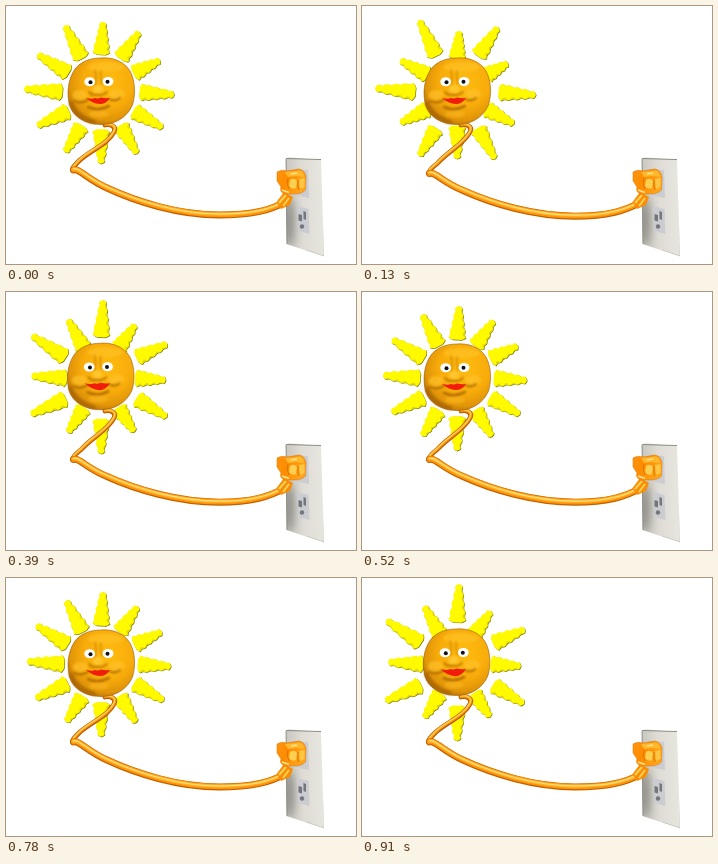
An HTML page for the animation above (1.04 s loop, 350 by 258 pixels).

```html
<!DOCTYPE html>
<html lang="en">
<head>
<meta charset="utf-8">
<title>Plugged-in sun</title>
<style>
html, body { margin: 0; width: 100%; height: 100%; overflow: hidden; background: #fff; }
svg { display: block; width: 100vw; height: 100vh; }
</style>
</head>
<body>
<svg viewBox="0 0 350 258" xmlns="http://www.w3.org/2000/svg">
  <defs>
    <radialGradient id="skin" cx="60%" cy="36%" r="68%">
      <stop offset="0" stop-color="#ffbc10"/>
      <stop offset=".55" stop-color="#f8ac0a"/>
      <stop offset=".85" stop-color="#e09408"/>
      <stop offset="1" stop-color="#b87004"/>
    </radialGradient>
    <linearGradient id="plate" x1="0" y1=".6" x2="1" y2=".5">
      <stop offset="0" stop-color="#c4c3bc"/>
      <stop offset=".45" stop-color="#dedcd4"/>
      <stop offset="1" stop-color="#e8e7df"/>
    </linearGradient>
    <linearGradient id="plug" x1="0" y1="0" x2="1" y2=".4">
      <stop offset="0" stop-color="#ff9410"/>
      <stop offset=".45" stop-color="#ff8c00"/>
      <stop offset="1" stop-color="#ffa41c"/>
    </linearGradient>
    <filter id="soft" x="-50%" y="-50%" width="200%" height="200%"><feGaussianBlur stdDeviation="1"/></filter>
    <filter id="haze" x="-100%" y="-50%" width="300%" height="200%"><feGaussianBlur stdDeviation="4"/></filter>
    <clipPath id="front"><path d="M279.500 152.500L283 151.500L315 153L318 250.500L280.500 238Z"/></clipPath>
  </defs>

  <g clip-path="url(#front)">
    <path d="M279 151H319V251H279Z" fill="url(#plate)"/>
    <ellipse cx="283" cy="216" rx="5" ry="24" fill="#77756f" opacity=".75" filter="url(#haze)"/>
    <path d="M280 153L281 238M280 152.500L315 153.500" stroke="#8b8a84" fill="none"/>
    <path d="M317.600 156L318 250L300 244" stroke="#c5c4bc" stroke-width=".8" fill="none"/>
    <path d="M286 163L302 164L303 192L287 189Z" fill="#cccdd2"/>
    <path d="M291 200L302.500 203L303.500 228L292 225Z" fill="#cbccd1"/>
    <g fill="#75757c">
      <path d="M292.500 208L296 209L296 215.500L292.500 214.500Z"/>
      <path d="M297.500 205L300 206L300 214L297.500 213Z"/>
      <circle cx="296" cy="220.500" r="2.200"/>
    </g>
  </g>

  <g id="rays"></g>

  <g id="cord" fill="none" stroke-linecap="round" stroke-linejoin="round"></g>

  <g id="connector">
    <path d="M270.500 196L278 186L287 191L284 199L275 203Z" fill="#f88e08"/>
    <path d="M273 197L280 189M277 200L283 192" stroke="#ffd050" stroke-width="2" fill="none"/>
    <path d="M271 166Q275 163 281 165L293 163Q299 164 300 171L299.500 184Q296 188 288 188L279 188Q273 186 275 181L271 175Z" fill="url(#plug)" stroke="#d87400" stroke-width=".5"/>
    <path d="M279 166L294 164.500Q298 166 298 171L290 170L282 171Z" fill="#ffb92e"/>
    <path d="M284 174Q288 171 291 175L290 182Q286 184 283 180Z" fill="#ffcf52"/>
    <path d="M293 173L298.500 172L298.500 181L294 183Z" fill="#ffc644"/>
    <path d="M282 172Q280 178 283 183M292 174Q291 180 293 184" stroke="#d87600" fill="none"/>
    <path d="M276 184L283 186.500M285 168L291 167" stroke="#ffe28c" stroke-width="1.600" fill="none"/>
  </g>

  <g id="head">
    <path d="M95 52C106 51 118 55 124 65C129 74 130 88 126.500 99C121 112 108 119 94 118.500C79 118 67 111 63.500 99C60.500 87 62 73 69 63C75 55.500 84 52 95 52Z" fill="url(#skin)" stroke="#9a5c05" stroke-width=".6"/>
    <g filter="url(#soft)" fill="none" stroke-linecap="round">
      <path d="M65 97Q70 111 88 116" stroke="#a86604" stroke-width="4" opacity=".75"/>
      <ellipse cx="100" cy="61" rx="18" ry="5" fill="#ffc52a" opacity=".6"/>
      <path d="M89 64Q91 71 89 79M95 65Q94 72 96 78" stroke="#d28a08" stroke-width="1.500"/>
      <ellipse cx="74" cy="89" rx="7.500" ry="5" fill="#ffc026" opacity=".7"/>
      <ellipse cx="111" cy="88" rx="8" ry="5" fill="#ffc026" opacity=".7"/>
      <ellipse cx="92" cy="83" rx="5" ry="4" fill="#ffc62e"/>
      <path d="M83 86Q86 90 91 88.500Q97 90 101 86" stroke="#b06a04" stroke-width="1.600"/>
      <path d="M68 95Q75 98 82 94M103 93Q109 96 114 92" stroke="#a86404" stroke-width="1.800"/>
      <path d="M82 101Q92 106 103 100" stroke="#a86404" stroke-width="2.200"/>
      <ellipse cx="93" cy="108" rx="10" ry="3.500" fill="#f9b21a" opacity=".7"/>
    </g>
    <g id="eyes">
      <ellipse cx="83.700" cy="75.800" rx="5.400" ry="4.500" fill="#fff"/>
      <ellipse cx="102" cy="75.500" rx="5.400" ry="4.500" fill="#fff"/>
      <circle cx="84.500" cy="76.200" r="2" fill="#101018"/>
      <circle cx="101.500" cy="75.800" r="2" fill="#101018"/>
    </g>
    <g id="lids" filter="url(#soft)">
      <ellipse cx="83.500" cy="74" rx="5.500" ry="3.500" fill="#ffb81c"/>
      <ellipse cx="102" cy="74" rx="5.500" ry="3.500" fill="#ffb81c"/>
      <path d="M78 78Q83 81 89 78M97 78Q102 81 108 78" fill="none" stroke="#d28a08" stroke-width="1.200"/>
    </g>
    <g id="mouth">
      <path d="M80 92Q86 93.500 89 92Q92 93 95 91.500Q99 92.500 104 92Q100 98 94 98Q86 97.500 80 92Z" fill="#f01c0c"/>
    </g>
  </g>
</svg>
<script>
const NS = 'http://www.w3.org/2000/svg';
const CX = 95, CY = 86, STEP = 130;
const $ = id => document.getElementById(id);

// Clockwise from twelve: retracted tip x, y, then extended tip x, y.
const TIPS = [
  [2, -61, 2, -80], [34, -53, 41, -65], [51, -29, 68, -35], [64, 2, 79, 3],
  [57, 32, 67, 40], [33, 53, 38, 67], [0, 67, 0, 77], [-33, 54, -38, 64],
  [-57, 31, -72, 37], [-69, -2, -82, -4], [-57, -32, -71, -44], [-33, -58, -38, -72]
];

// Reach of even rays, reach of odd rays, cord slack, eyes closed
const POSES = [
  [.48, .62, 0, 0], [0, 1, 1, 0], [.58, .4, 1, 0], [.9, .06, 1, 0],
  [.58, .4, 1, 0], [0, 1, 1, 1], [.58, .4, 0, 0], [1, 0, 0, 0]
];

const mix = (a, b, t) => a + (b - a) * t;

function add(parent, attrs) {
  const el = document.createElementNS(NS, 'path');
  for (const k in attrs) el.setAttribute(k, attrs[k]);
  return parent.appendChild(el);
}

const rays = TIPS.map(() => ({
  shade: add($('rays'), { fill: '#77730a', transform: 'translate(.6 .6)' }),
  body: add($('rays'), { fill: '#fffa00' }),
  side: add($('rays'), { fill: '#d8d000', opacity: .7 })
}));

function cable(w, dark, main) {
  const layers = [[dark, w, 0], [main, w - 1.6, -.4], ['#ffb62c', w * .42, -.8], ['#ffe07a', w * .16, -1.1]];
  return layers.map(([stroke, width, dy]) =>
    add($('cord'), { stroke, 'stroke-width': width, transform: `translate(0 ${dy})` }));
}
const upper = cable(4.8, '#b85a00', '#f58406');
const lower = cable(7, '#c06000', '#ff9208');

function drawCord(slack) {
  const s = 3.5 * slack, b = 1.2 * slack;
  const up = `M99 119C104 118 111 120 108 126C102 138 ${85 + b} ${144 + b} ${74 + b} ${154 + s}C69 ${159 + s} 66 ${162 + s} 66.500 ${164 + s}`;
  const low = `M67.500 ${164 + s}C73 ${162 + s} 81 ${173 + s} 101 ${182 + s * .7}C130 ${195.500 + s * .6} 172 ${209 + b} 213 ${209 + b}C246 ${209 + b} 264 204.500 279 196`;
  upper.forEach(p => p.setAttribute('d', up));
  lower.forEach(p => p.setAttribute('d', low));
}

function drawRay(i, reach) {
  const [ix, iy, ox, oy] = TIPS[i];
  const a = i * Math.PI / 6, r = mix(33.5, 41.5, reach);
  const bx = CX + r * Math.sin(a), by = CY - r * Math.cos(a);
  const dx = CX + mix(ix, ox, reach) - bx, dy = CY + mix(iy, oy, reach) - by;
  const len = Math.hypot(dx, dy), ux = dx / len, uy = dy / len;
  const at = (u, w) => `${(bx + dx * u - uy * w).toFixed(2)} ${(by + dy * u + ux * w).toFixed(2)}`;
  const half = u => {
    const cap = Math.min(1, Math.sqrt(.25 + u * 10), Math.sqrt((1 - u) * 16));
    return (8.7 - 5.9 * u + .55 * Math.sin(u * 9 * Math.PI)) * cap;
  };
  // The shaded flank is the one facing down and right.
  const flank = ux - uy > 0 ? 1 : -1;
  const left = [], right = [], edge = [], inner = [];
  for (let n = 0; n <= 40; n++) {
    const u = n / 40, w = half(u);
    left.push(at(u, -w));
    right.unshift(at(u, w));
    edge.push(at(u, flank * w));
    inner.unshift(at(u, flank * w * (.82 + .12 * Math.sin(u * 9 * Math.PI))));
  }
  const outline = (p, q) => 'M' + p.concat(q).join('L') + 'Z';
  const d = outline(left, right);
  rays[i].shade.setAttribute('d', d);
  rays[i].body.setAttribute('d', d);
  rays[i].side.setAttribute('d', outline(edge, inner));
}

let last = -1;
function render(ms) {
  const step = Math.floor(ms / STEP) % POSES.length;
  if (step === last) return;
  last = step;
  const [even, odd, slack, shut] = POSES[step];
  TIPS.forEach((_, i) => drawRay(i, i % 2 ? odd : even));
  drawCord(slack);
  const lift = Math.max(0, even - .6) * 2.5;
  $('head').setAttribute('transform', `translate(${-.7 * lift} ${-lift})`);
  $('mouth').setAttribute('transform', `translate(93 92) scale(${1 + .06 * lift} ${1 + .2 * lift}) translate(-93 -92)`);
  $('eyes').style.display = shut ? 'none' : '';
  $('lids').style.display = shut ? '' : 'none';
}

const start = performance.now();
function tick() {
  render(performance.now() - start);
  requestAnimationFrame(tick);
}
tick();
</script>
</body>
</html>
```
